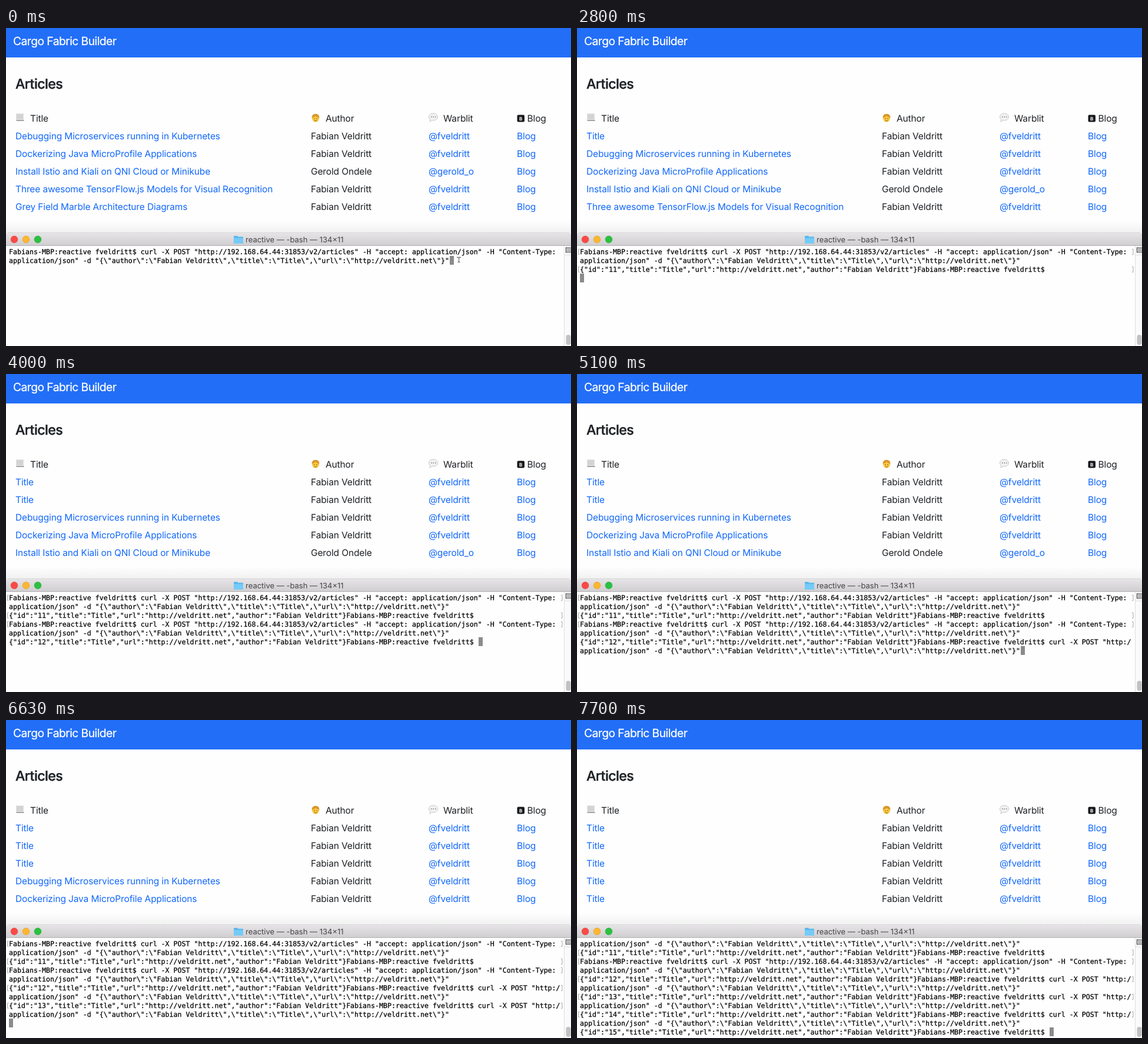
An HTML page that plays this animation: 960 by 540 pixels, repeating every 8 s.

```html
<!DOCTYPE html>
<html lang="en">
<head>
<meta charset="utf-8">
<title>Articles</title>
<style>
  html, body { margin: 0; width: 100%; height: 100%; overflow: hidden; background: #fefefe; }
  svg { display: block; width: 960px; height: 540px; }
  text { white-space: pre; text-rendering: geometricPrecision; }
  .ui { font: 15.5px Inter, Roboto, sans-serif; letter-spacing: -.13px; fill: #1d2024; }
  .ui .brand { font-size: 19.3px; letter-spacing: -.55px; fill: #fff; stroke: #fff; stroke-width: .3; }
  .ui .heading { font-size: 23.2px; font-weight: 500; letter-spacing: -.6px; stroke: #1d2024; stroke-width: .4; }
  .ui .window { font-size: 13px; letter-spacing: 0; fill: #454345; }
  .ui .link { fill: #1167fb; }
  .term { font: 11.627px "DejaVu Sans Mono", "Liberation Mono", monospace; fill: #000; }
  .term text { stroke: #000; stroke-width: .25; }
  .mark { fill: none; stroke: #a6a6a6; }
</style>
</head>
<body>
<svg viewBox="0 0 960 540">
  <defs>
    <linearGradient id="bar" x2="0" y2="1">
      <stop stop-color="#e7e5e7"/><stop offset="1" stop-color="#cfcdcf"/>
    </linearGradient>
    <linearGradient id="shade" x2="0" y2="1">
      <stop stop-color="#000" stop-opacity="0"/><stop offset="1" stop-color="#000" stop-opacity=".05"/>
    </linearGradient>
  </defs>
  <rect width="960" height="540" fill="#fefefe"/>

  <g class="ui">
    <rect width="960" height="50" fill="#226ef7"/>
    <text class="brand" x="12" y="29">Cargo Fabric Builder</text>
    <text class="heading" x="16" y="103">Articles</text>
    <text x="41" y="159">Title</text>
    <text x="543" y="159">Author</text>
    <text x="743" y="159">Warblit</text>
    <text x="885.5" y="159">Blog</text>
    <g id="list"></g>
  </g>

  <!-- column icons -->
  <path d="M17 145h13v10l1 3H18l-1-3z" fill="#e2e2e2"/>
  <path d="M18 147.500h11M18 149.500h11M18 151.500h11M18 153.500h11" stroke="#bdbdbd" stroke-width=".8"/>
  <path d="M17 156h13l1 2H18z" fill="#a4a4a4"/>
  <circle cx="526" cy="152" r="6.300" fill="#d9962c"/>
  <ellipse cx="526" cy="154" rx="5.800" ry="5.800" fill="#fdca42"/>
  <path d="M520 152q4 0 6-3q2 3 6 3q0-6-6-6t-6 6" fill="#d9962c"/>
  <circle cx="524" cy="154" r=".8" fill="#63431c"/>
  <circle cx="528" cy="154" r=".8" fill="#63431c"/>
  <path d="M523.500 157q2.500 2 5 0" fill="none" stroke="#95551f" stroke-width=".9"/>
  <path d="M726 145c4.500 0 7.500 2.600 7.500 6s-3 6-7.500 6q-1.500 0-2.500-.3q-1.500 2-4 2.300q1.500-1.500 1.200-3.500q-2.200-1.700-2.200-4.500c0-3.400 3-6 7.500-6z" fill="#f1f1f1" stroke="#bcbcbc" stroke-width=".8"/>
  <path d="M722 151h1.500m2 0h1.500m2 0h1.500" stroke="#777" stroke-width="1.500"/>
  <rect x="868.500" y="147.500" width="12.500" height="12" rx="2" fill="#17191c"/>
  <text x="874.750" y="156.500" font-family="Inter, sans-serif" font-size="8" font-weight="700" text-anchor="middle" fill="#fff">B</text>

  <!-- terminal window -->
  <rect y="327" width="960" height="20" fill="url(#shade)"/>
  <rect y="370" width="960" height="170" fill="#fefefe"/>
  <path d="M0 370V351q0-4 4-4H956q4 0 4 4V370z" fill="url(#bar)"/>
  <path d="M0 369.500H960" stroke="#b3b1b3"/>
  <path d="M3 347.500H957" stroke="#dad8da"/>
  <g stroke-width=".6">
    <circle cx="14" cy="359" r="5.900" fill="#fb4a45" stroke="#dc3c37"/>
    <circle cx="34" cy="359" r="5.900" fill="#fdb630" stroke="#dc9a25"/>
    <circle cx="54" cy="359" r="5.900" fill="#2bc140" stroke="#1fa431"/>
  </g>
  <path d="M387 354q0-1 1-1h5l1.500 1.500H402q1 0 1 1V365q0 1-1 1H388q-1 0-1-1z" fill="#55b7ef"/>
  <path d="M387 356.500H403V365q0 1-1 1H388q-1 0-1-1z" fill="#74cbf8"/>
  <g class="ui"><text class="window" x="407" y="364">reactive — -bash — 134×11</text></g>

  <rect x="948" y="370" width="12" height="170" fill="#fafafa"/>
  <path d="M948.500 370V540M948 385.500H960" stroke="#dfdfdf"/>
  <path d="M960 373H951.500V381H960M953 375.500H960M953 378.500H960" fill="none" stroke="#3c3c3c" stroke-width="1.200"/>
  <rect x="951.500" y="521" width="8" height="17" rx="4" fill="#c1c1c1"/>

  <rect id="cursor" width="7" height="15" fill="#8b8b8b"/>
  <g id="term" class="term"></g>
  <path id="pointer" d="M766 389.500h2.500l1 1l1-1H773M769.500 390V397.500M767.500 397.500h4" fill="none" stroke="#777" stroke-width="1.300"/>
</svg>

<script>
const LOOP = 8000, COLS = 134, ROWS = 11, CELL = 7, LEFT = 5, TOP = 372, LINE = 15;
const FABIAN = ['Fabian Veldritt', '@fveldritt'], GEROLD = ['Gerold Ondele', '@gerold_o'];
const ARTICLES = [
  ['Debugging Microservices running in Kubernetes', FABIAN],
  ['Dockerizing Java MicroProfile Applications', FABIAN],
  ['Install Istio and Kiali on QNI Cloud or Minikube', GEROLD],
  ['Three awesome TensorFlow.js Models for Visual Recognition', FABIAN],
  ['Grey Field Marble Architecture Diagrams', FABIAN]
];
const PROMPT = 'Fabians-MBP:reactive fveldritt$ ';
const HEAD = 'curl -X POST "http://192.168.64.44:31853/v2/articles" -H "accept: application/json" -H "Content-Type: ';
const TAIL = String.raw`application/json" -d "{\"author\":\"Fabian Veldritt\",\"title\":\"Title\",\"url\":\"http://veldritt.net\"}"`;
const reply = id => `{"id":"${id}","title":"Title","url":"http://veldritt.net","author":"Fabian Veldritt"}`;

// times at which each request is recalled, sent, answered and listed
const RUNS = [
  { recall: 0, send: 500, answer: 700, list: 770 },
  { recall: 3500, send: 3830, answer: 3930, list: 3970 },
  { recall: 5100, send: 5500, answer: 5570, list: 5600 },
  { recall: 6330, send: 6600, answer: 6700, list: 6760 },
  { recall: 7360, send: 7600, answer: 7640, list: 7670 }
];
const BLANK = { enter: 2800, prompt: 2830 };

const $ = id => document.getElementById(id);
function add(parent, tag, attrs) {
  const el = document.createElementNS('http://www.w3.org/2000/svg', tag);
  for (const key in attrs) el.setAttribute(key, attrs[key]);
  return parent.appendChild(el);
}
function setText(el, text) {
  if (el.textContent !== text) el.textContent = text;
}

const listRows = ARTICLES.map((_, i) => [16, 518, 718, 868].map((x, col) =>
  add($('list'), 'text', { x, y: 189 + 30 * i, class: col === 1 ? '' : 'link' })));

const termRows = Array.from({ length: ROWS }, (_, i) => {
  const y = TOP + LINE * i;
  return {
    text: add($('term'), 'text', { x: LEFT, y: y + 12 }),
    mark: add($('term'), 'path', { class: 'mark', d: `M4.500 ${y + 3.5}h-2v9h2M943 ${y + 3.5}h2v9h-2` })
  };
});

function termLines(t) {
  const lines = [];
  let text = PROMPT;
  const push = marked => { lines.push({ text, marked }); text = ''; };
  RUNS.forEach((run, i) => {
    if (t < run.recall) return;
    text = (text + HEAD).slice(0, COLS);
    push(t >= run.send);
    text = TAIL;
    if (t < run.send) return;
    push(false);
    if (t >= run.answer) text = reply(11 + i) + PROMPT;
    if (i === 0 && t >= BLANK.enter) {
      push(true);
      if (t >= BLANK.prompt) text = PROMPT;
    }
  });
  push(false);
  return lines;
}

function draw(t) {
  const added = RUNS.filter(run => t >= run.list).map(() => ['Title', FABIAN]);
  const articles = added.concat(ARTICLES);
  listRows.forEach((cells, i) => {
    const [title, author] = articles[i];
    [title, ...author, 'Blog'].forEach((text, col) => setText(cells[col], text));
  });

  const lines = termLines(t).slice(-ROWS);
  termRows.forEach((row, i) => {
    const line = lines[i] || { text: '', marked: false };
    setText(row.text, line.text);
    row.mark.style.display = line.marked ? '' : 'none';
  });
  const last = lines.length - 1;
  $('cursor').setAttribute('x', LEFT + CELL * lines[last].text.length);
  $('cursor').setAttribute('y', TOP + LINE * last);
  $('pointer').style.display = t < RUNS[0].send ? '' : 'none';
}

const start = performance.now();
function tick() {
  draw((performance.now() - start) % LOOP);
  requestAnimationFrame(tick);
}
tick();
</script>
</body>
</html>
```
